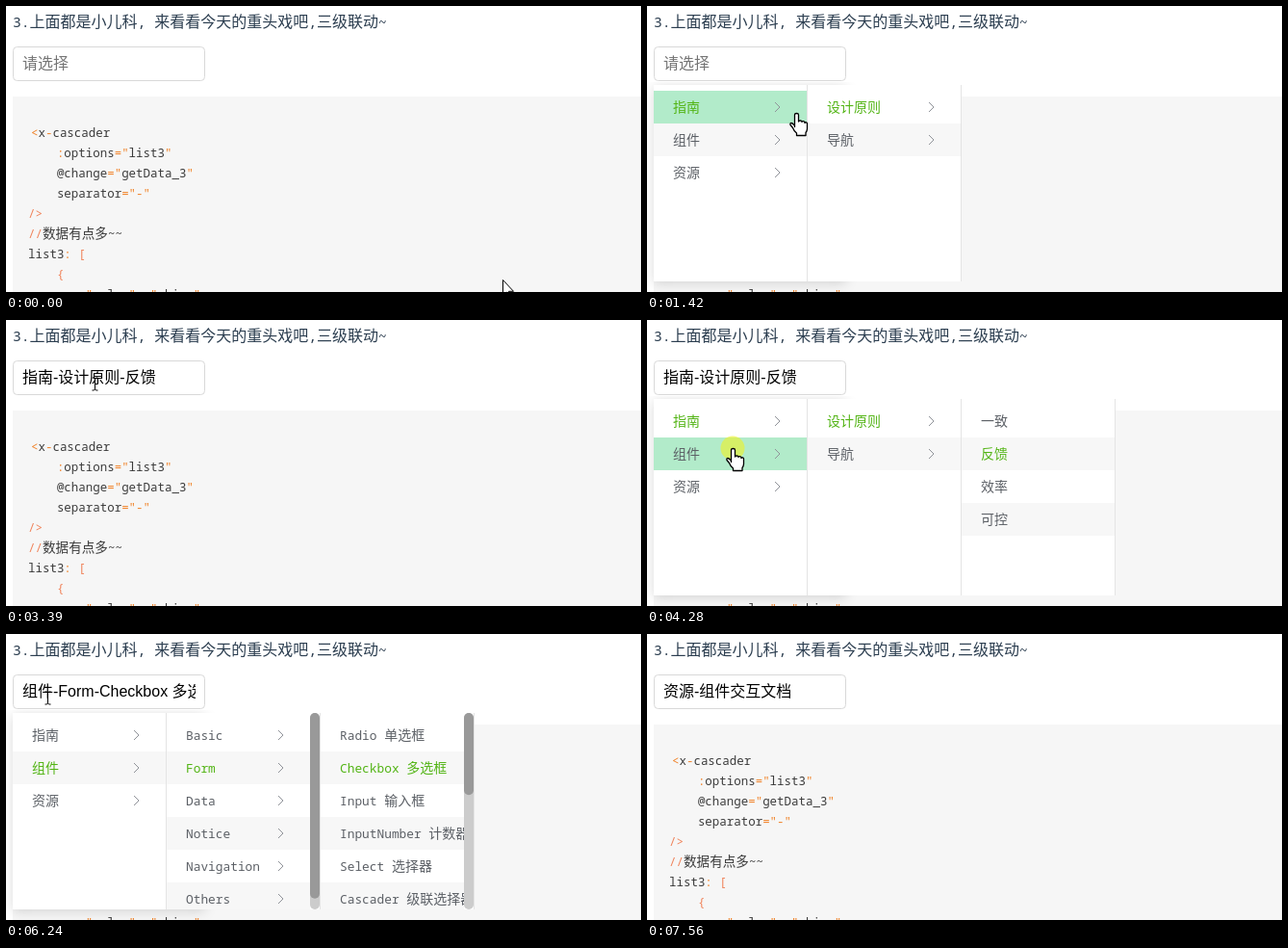
Animation of 660x297 px, one loop 8060 ms. Source, as an HTML page with a canvas:

```html
<!DOCTYPE html>
<html lang="zh">
<head>
<meta charset="utf-8">
<title>三级联动</title>
<style>
  html, body { margin: 0; width: 100%; height: 100%; overflow: hidden; background: #fff; }
  canvas { display: block; }
</style>
</head>
<body>
<canvas id="stage" width="660" height="297"></canvas>
<script>
const ctx = document.getElementById('stage').getContext('2d');
const LOOP = 8060;
const MONO = '"Noto Sans Mono"', SANS = '"Liberation Sans"';
const GREEN = '#52b414', GREY = '#5c6066';
const COL_W = 160, LEFT = 7, TOP = 82, HEIGHT = 204, ROW = 34, PAD = 6;

const CODE = [
  '<x-cascader',
  '    :options="list3"',
  '    @change="getData_3"',
  '    separator="-"',
  '/>',
  '//数据有点多~~',
  'list3: [',
  '    {',
  '        "value": "china",'
];

// total: rows in the list, including those below the fold
const column = (names, active, arrows, total = names.length) => ({ names, active, arrows, total });
const root = active => column(['指南', '组件', '资源'], active, true);
const guide = column(['设计原则', '导航'], 0, true);
const rules = active => column(['一致', '反馈', '效率', '可控'], active, false);
const parts = active => column(['Basic', 'Form', 'Data', 'Notice', 'Navigation', 'Others'], active, true);
const form = active => column(['Radio 单选框', 'Checkbox 多选框', 'Input 输入框',
  'InputNumber 计数器', 'Select 选择器', 'Cascader 级联选择器'], active, false, 14);
const docs = column(['组件交互文档'], 0, false);

const FIRST = '指南-设计原则-反馈', SECOND = '组件-Form-Checkbox 多选框', THIRD = '资源-组件交互文档';
const STATES = [
  [0, '', []],
  [600, '', [root(0)]],
  [1230, '', [root(0), guide]],
  [2040, '', [root(0), guide, rules(0)]],
  [2890, FIRST, []],
  [3710, FIRST, [root(0), guide, rules(1)]],
  [4410, FIRST, [root(1), parts(0)]],
  [4810, FIRST, [root(1), parts(1), form(0)]],
  [5350, SECOND, []],
  [6240, SECOND, [root(1), parts(1), form(1)]],
  [6660, SECOND, [root(2), docs]],
  [7180, THIRD, []]
];

const PATH = [
  [0, 516, 284], [60, 516, 284], [460, 196, 63], [810, 196, 63], [950, 155, 112],
  [1450, 155, 111], [1850, 235, 106], [2050, 235, 106], [2290, 368, 149], [2370, 368, 149],
  [2560, 370, 142], [2900, 370, 142], [3380, 92, 66], [3720, 92, 66], [3900, 89, 133],
  [4420, 89, 133], [4660, 215, 140], [4830, 215, 140], [5010, 321, 143], [5080, 350, 143],
  [5150, 353, 141], [5370, 353, 141], [5900, 43, 66], [6260, 43, 66], [6500, 90, 172],
  [6680, 90, 172], [6990, 225, 107], [7200, 225, 107], [7550, 616, 300], [LOOP, 616, 300]
];
const CLICKS = [480, 1110, 1920, 2760, 3590, 4280, 4690, 5220, 5980, 6540, 7050];

const HAND = new Path2D('M-2 14V1.5Q-2 0 0 0T2 1.5V8.5Q2 7.5 3.8 7.5T5.5 9Q5.5 8 7 8.2T8.5 10' +
  'Q8.8 9 10 9.3T11 11V16Q11 18 9.5 20V23H0V20.5Q-3 18 -4 15L-6.5 12Q-7 10 -5.5 10Q-4 10 -2 13Z');
const ARROW = new Path2D('M0 0V16L3.7 12.6L6.3 18.5L8.6 17.5L6 11.8H11Z');
const BEAM = new Path2D('M-3 -6.5H-1L0 -5.5L1 -6.5H3M0 -5.5V5.5M-3 6.5H-1L0 5.5L1 6.5H3');

function rect(x, y, w, h, color) {
  ctx.fillStyle = color;
  ctx.fillRect(x, y, w, h);
}

function pill(x, y, w, h, color) {
  ctx.fillStyle = color;
  ctx.beginPath();
  ctx.roundRect(x, y, w, h, w / 2);
  ctx.fill();
}

// Latin and CJK runs use separate sizes; returns the end position.
function text(s, x, y, size, color, family = MONO) {
  ctx.fillStyle = color;
  for (const run of s.match(/[\x00-\x7f]+|[^\x00-\x7f]+/g) || []) {
    const latin = run.charCodeAt(0) < 128;
    const px = latin && family === MONO ? size * 0.9167 : size;
    ctx.font = `${px}px ${latin ? family + ', ' : ''}"Noto Sans CJK SC", ${family === MONO ? 'monospace' : 'sans-serif'}`;
    ctx.fillText(run, x, y);
    x += ctx.measureText(run).width;
  }
  return x;
}

function clipped(x, y, w, h, draw) {
  ctx.save();
  ctx.beginPath();
  ctx.rect(x, y, w, h);
  ctx.clip();
  draw();
  ctx.restore();
}

function drawPage(value) {
  rect(0, 0, 660, 297, '#fff');
  text('3.上面都是小儿科, 来看看今天的重头戏吧,三级联动~', 7, 22, 16, '#2c3e50');
  rect(7, 94, 653, 203, '#f6f6f6');
  CODE.forEach((line, i) => {
    let x = i ? 23 : 26;
    for (const part of line.match(/[<>\/:=\[{"-]|[^<>\/:=\[{"-]+/g)) {
      const color = /[\/>\[{]/.test(part) ? '#f0835a' : /[<:="-]/.test(part) ? '#f08228' : '#3c3c3c';
      x = text(part, x, 136 + 21 * i, 13.6, color);
    }
  });
  ctx.beginPath();
  ctx.roundRect(7.5, 42.5, 199, 35, 4);
  ctx.fillStyle = '#fff';
  ctx.fill();
  ctx.strokeStyle = '#d9d9d9';
  ctx.lineWidth = 1;
  ctx.stroke();
  clipped(17, 43, 180, 34, () =>
    text(value || '请选择', 17, 65, 16, value ? '#000' : '#757575', SANS));
}

function drawColumn({ names, active, arrows, total }, index, hover) {
  const x = LEFT + index * COL_W;
  const content = total * ROW + 2 * PAD;
  const scrolls = content > HEIGHT;
  const width = COL_W - 1 - (scrolls ? 10 : 0);
  rect(x, TOP, COL_W, HEIGHT, '#fff');
  clipped(x, TOP, width, HEIGHT, () => names.forEach((name, i) => {
    const y = TOP + PAD + i * ROW;
    if (hover === i) rect(x, y, width, ROW, '#b2ebca');
    else if (i % 2) rect(x, y, width, ROW, '#f7f7f7');
    text(name, x + 20, y + 22, 14, i === active ? GREEN : GREY);
    if (!arrows) return;
    const ax = x + width - 33, ay = y + 17;
    ctx.beginPath();
    ctx.moveTo(ax, ay - 5);
    ctx.lineTo(ax + 5, ay);
    ctx.lineTo(ax, ay + 5);
    ctx.strokeStyle = '#909399';
    ctx.stroke();
  }));
  if (scrolls) {
    pill(x + width, TOP, 10, HEIGHT, '#ccc');
    pill(x + width, TOP, 10, HEIGHT * HEIGHT / content, '#999');
  }
  rect(x + COL_W - 1, TOP, 1, HEIGHT, '#e4e4e4');
}

function drawPanel(cols, hover) {
  if (!cols.length) return;
  ctx.save();
  ctx.shadowColor = 'rgba(0,0,0,.15)';
  ctx.shadowBlur = 12;
  ctx.shadowOffsetY = 2;
  // keep the shadow off the input above
  clipped(0, 79, 660, 218, () => rect(LEFT, TOP, 200, HEIGHT, '#fff'));
  ctx.restore();
  cols.forEach((col, i) => drawColumn(col, i, hover && hover.col === i ? hover.row : -1));
}

function pointerAt(t) {
  const i = Math.max(1, PATH.findIndex(p => p[0] >= t));
  const [t0, x0, y0] = PATH[i - 1], [t1, x1, y1] = PATH[i];
  const u = Math.min(1, Math.max(0, (t - t0) / (t1 - t0)));
  const e = u * u * (3 - 2 * u);
  return [x0 + (x1 - x0) * e, y0 + (y1 - y0) * e];
}

function rowAt([x, y], cols) {
  const col = Math.floor((x - LEFT) / COL_W);
  const row = Math.floor((y - TOP - PAD) / ROW);
  const list = cols[col];
  if (!list || !list.names[row]) return null;
  const bar = list.total * ROW + 2 * PAD > HEIGHT ? 10 : 0;
  return x - LEFT - col * COL_W < COL_W - 1 - bar ? { col, row } : null;
}

function drawPointer([x, y], cols, pressed) {
  if (pressed) {
    ctx.fillStyle = 'rgba(236,242,40,.62)';
    ctx.beginPath();
    ctx.arc(x, y, 12.5, 0, 2 * Math.PI);
    ctx.fill();
  }
  const inInput = x > 7 && x < 207 && y > 42 && y < 78;
  const shape = inInput ? BEAM : rowAt([x, y], cols) ? HAND : ARROW;
  ctx.save();
  ctx.translate(Math.round(x) + 0.5, Math.round(y) + 0.5);
  ctx.fillStyle = '#fff';
  if (shape !== BEAM) ctx.fill(shape);
  ctx.strokeStyle = '#000';
  ctx.lineWidth = shape === HAND ? 1.3 : 1;
  ctx.lineJoin = 'round';
  ctx.stroke(shape);
  ctx.restore();
}

function render(t) {
  const [, value, cols] = STATES.findLast(s => s[0] <= t);
  const pointer = pointerAt(t);
  const hover = rowAt(pointerAt(Math.max(0, t - 70)), cols);
  ctx.lineWidth = 1;
  drawPage(value);
  drawPanel(cols, hover);
  drawPointer(pointer, cols, CLICKS.some(c => t >= c && t < c + 120));
}

const start = performance.now();
function tick() {
  render((performance.now() - start) % LOOP);
  requestAnimationFrame(tick);
}
tick();
</script>
</body>
</html>
```
